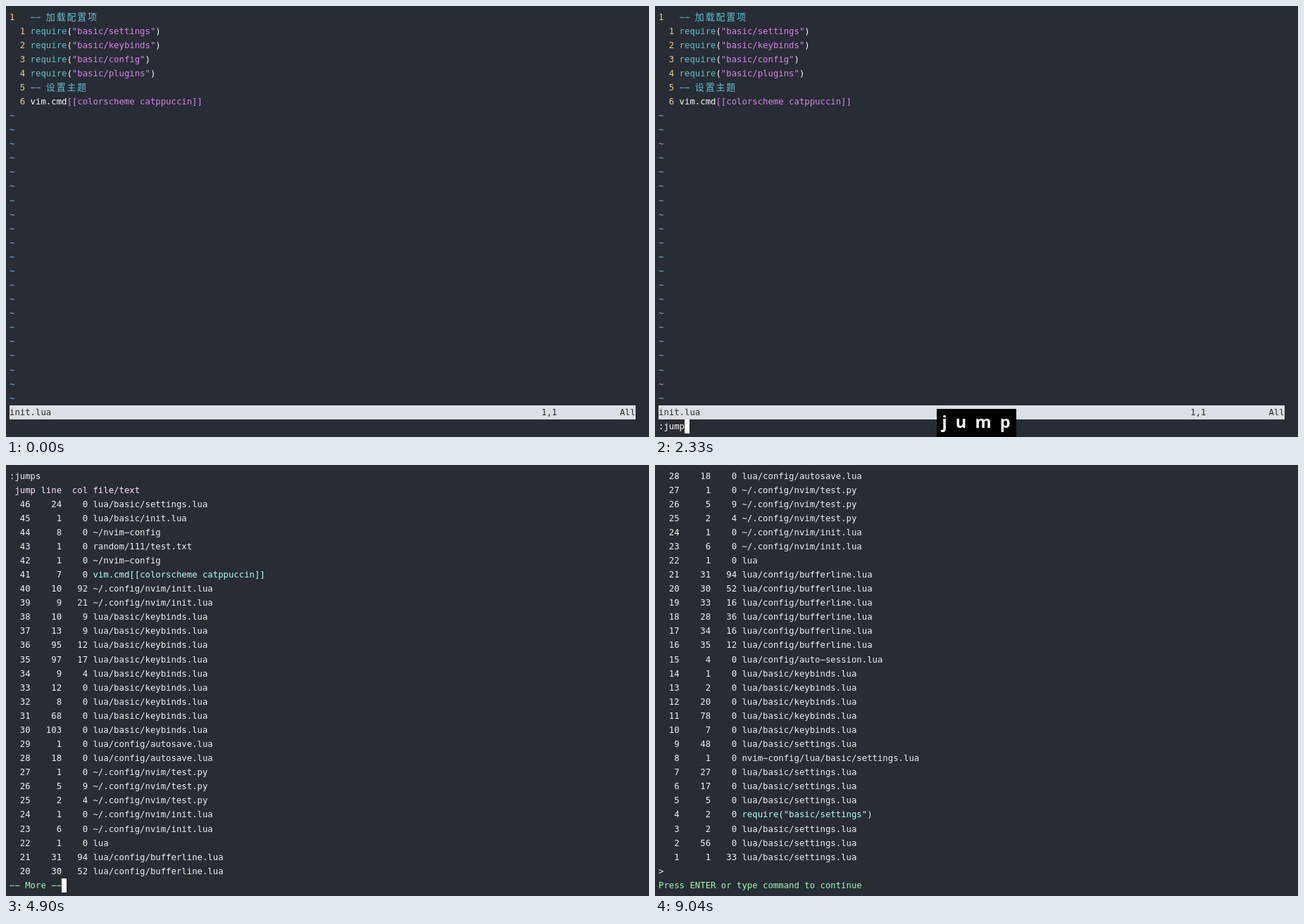
An HTML page for the animation above (9130 ms loop, 913 by 613 pixels).

```html
<!DOCTYPE html>
<html lang="zh">
<head>
<meta charset="utf-8">
<title>Jump list</title>
<style>
html, body { margin: 0; width: 100%; height: 100%; overflow: hidden; background: #282c34; }
svg { display: block; width: 100%; height: 100%; }
text { white-space: pre; }
#term text { font: 12.3px "DejaVu Sans Mono", "Noto Sans CJK SC", monospace; }
#term .cjk { font: 13px "Noto Sans CJK SC", "Noto Sans CJK", sans-serif; letter-spacing: 1.8px; }
#keys text { font: 700 23.5px "Open Sans", "Noto Sans", sans-serif; text-anchor: middle; fill: #fff; }
rect { shape-rendering: crispEdges; }
</style>
</head>
<body>
<svg viewBox="0 0 913 613" xmlns="http://www.w3.org/2000/svg">
  <rect width="913" height="613" fill="#282c34"/>
  <g id="term"></g>
  <g id="keys"></g>
</svg>
<script>
const LOOP = 9130;
const CELL = 7.405, ROW = 20.08, LEFT = 5, TOP = 5.5, BASE = 19.52;
const C = {
  bar: '#dcdfe4', fg: '#eef0f4', light: '#fafbfd', dark: '#282c34', yellow: '#efcb88',
  cyan: '#5ac4d0', magenta: '#d884ee', blue: '#68b8f8', title: '#ffe2ff', file: '#b2fffb',
  more: '#94ffb6'
};

const colX = col => LEFT + col * CELL;
const esc = s => s.replace(/&/g, '&amp;').replace(/</g, '&lt;');

// Hyphens are drawn wide, as the terminal's font has them.
function put(row, col, str, color, cls = '') {
  const y = Math.round(BASE + row * ROW);
  return `<text class="${cls}" x="${colX(col).toFixed(2)}" y="${y}" fill="${color}">` +
    esc(str.replace(/-/g, '−')) + '</text>';
}

function box(x, y, w, h, fill) {
  return `<rect x="${x}" y="${y}" width="${w}" height="${h}" fill="${fill}"/>`;
}

function cursor(row, col) {
  return box(Math.round(colX(col) - 0.4), Math.round(TOP + row * ROW), 7, 20, '#fff');
}

// Editor view
function editor() {
  let out = put(0, 0, '1', C.yellow);
  for (let i = 1; i <= 6; i++) out += put(i, 2, String(i), C.yellow);
  [[0, '加载配置项'], [5, '设置主题']].forEach(([row, note]) => {
    out += put(row, 4, '--', C.cyan) + put(row, 7, note, C.cyan, 'cjk');
  });
  ['settings', 'keybinds', 'config', 'plugins'].forEach((name, i) => {
    const arg = `"basic/${name}"`;
    out += put(i + 1, 4, 'require', C.cyan) + put(i + 1, 11, '(', C.light) +
      put(i + 1, 12, arg, C.magenta) + put(i + 1, 12 + arg.length, ')', C.light);
  });
  out += put(6, 4, 'vim.cmd', C.light) + put(6, 11, '[[colorscheme catppuccin]]', C.magenta);
  for (let r = 7; r < 28; r++) out += put(r, 0, '~', C.blue);
  return out + box(5, 568, 889, 20, C.bar) + put(28, 0, 'init.lua', C.dark) +
    put(28, 102, '1,1', C.dark) + put(28, 117, 'All', C.dark);
}

// Jump list: groups of "path: line,col ..." counting down from 46
const jumps = `lua/basic/settings.lua: 24,0
lua/basic/init.lua: 1,0
~/nvim-config: 8,0
random/111/test.txt: 1,0
~/nvim-config: 1,0
vim.cmd[[colorscheme catppuccin]]: 7,0
~/.config/nvim/init.lua: 10,92 9,21
lua/basic/keybinds.lua: 10,9 13,9 95,12 97,17 9,4 12,0 8,0 68,0 103,0
lua/config/autosave.lua: 1,0 18,0
~/.config/nvim/test.py: 1,0 5,9 2,4
~/.config/nvim/init.lua: 1,0 6,0
lua: 1,0
lua/config/bufferline.lua: 31,94 30,52 33,16 28,36 34,16 35,12
lua/config/auto-session.lua: 4,0
lua/basic/keybinds.lua: 1,0 2,0 20,0 78,0 7,0
lua/basic/settings.lua: 48,0
nvim-config/lua/basic/settings.lua: 1,0
lua/basic/settings.lua: 27,0 17,0 5,0
require("basic/settings"): 2,0
lua/basic/settings.lua: 2,0 56,0 1,33`.split('\n').flatMap(group => {
  const [path, spots] = group.split(': ');
  return spots.split(' ').map(s => [path, ...s.split(',')]);
});

const listing = [
  row => put(row, 0, ':jumps', C.fg),
  row => put(row, 1, 'jump line  col file/text', C.title),
  ...jumps.map(([path, line, col], i) => row => {
    const nums = String(jumps.length - i).padStart(4) + line.padStart(6) + col.padStart(5);
    return put(row, 0, nums, C.fg) + put(row, 16, path, /[("[]/.test(path) ? C.file : C.fg);
  }),
  row => put(row, 0, '>', C.fg)
];

function page(first, prompt) {
  return listing.slice(first, first + 29).map((line, i) => line(i)).join('') +
    put(29, 0, prompt, C.more);
}

const MORE = '-- More --';
const ENTER = 'Press ENTER or type command to continue';
const views = { edit: editor(), top: page(0, MORE), end: page(listing.length - 29, ENTER) };

// [time, state changes]
const steps = [
  [0, { view: 'edit', cmd: '', cur: null, keys: '' }],
  [280, { cur: [0, 4] }],
  [930, { keys: 'Shift' }],
  [1130, { keys: 'Shift + ;' }],
  [1200, { cmd: ':', cur: [29, 1] }],
  [1920, { cmd: ':j', cur: [29, 2], keys: 'Shift + ;   j' }],
  [1990, { cmd: ':ju', cur: [29, 3], keys: 'j  u' }],
  [2060, { cmd: ':jum', cur: [29, 4], keys: 'j  u  m' }],
  [2330, { cmd: ':jump', cur: [29, 5], keys: 'j  u  m  p' }],
  [2460, { cmd: ':jumps', cur: [29, 6], keys: 'j  u  m  p  s' }],
  [2530, { keys: 'u  m  p  s' }],
  [2720, { keys: 'm  p  s' }],
  [2920, { keys: 'p  s' }],
  [3250, { keys: 's' }],
  [3380, { keys: '' }],
  [3980, { keys: 'Enter' }],
  [4050, { view: 'top', cmd: '', cur: [29, MORE.length] }],
  [4900, { keys: '' }],
  [6400, { keys: 'Shift' }],
  [6600, { view: 'end', cur: [29, ENTER.length], keys: 'Shift + G' }],
  [7530, { keys: '' }],
  [9040, { cur: null }]
];

// Box size follows the ink of the label: [width, top, baseline]
const badges = {
  'Shift': [67, 578, 605], 'Shift + ;': [101, 575, 602], 'Shift + ;   j': [127, 573, 600],
  'j  u': [51, 573, 600], 'j  u  m': [86, 573, 600], 'j  u  m  p': [113, 573, 600],
  'j  u  m  p  s': [135, 573, 600], 'u  m  p  s': [113, 578, 600], 'm  p  s': [87, 578, 600],
  'p  s': [52, 578, 600], 's': [25, 583, 605], 'Enter': [72, 580, 605],
  'Shift + G': [111, 578, 605]
};

function badge(label) {
  if (!label) return '';
  const [w, top, base] = badges[label];
  const mid = label[0] === 'j' ? 456 : 457.5;
  return box(mid - w / 2, top, w, 613 - top, '#000') + `<text x="${mid}" y="${base}">${label}</text>`;
}

const term = document.getElementById('term');
const keys = document.getElementById('keys');
let shown = -1;

function draw(t) {
  const past = steps.filter(s => s[0] <= t);
  if (past.length === shown) return;
  shown = past.length;
  const s = Object.assign({}, ...past.map(p => p[1]));
  term.innerHTML = views[s.view] + put(29, 0, s.cmd, C.light) + (s.cur ? cursor(...s.cur) : '');
  keys.innerHTML = badge(s.keys);
}

const start = performance.now();
function tick() {
  draw((performance.now() - start) % LOOP);
  requestAnimationFrame(tick);
}
draw(0);
requestAnimationFrame(tick);
</script>
</body>
</html>
```
